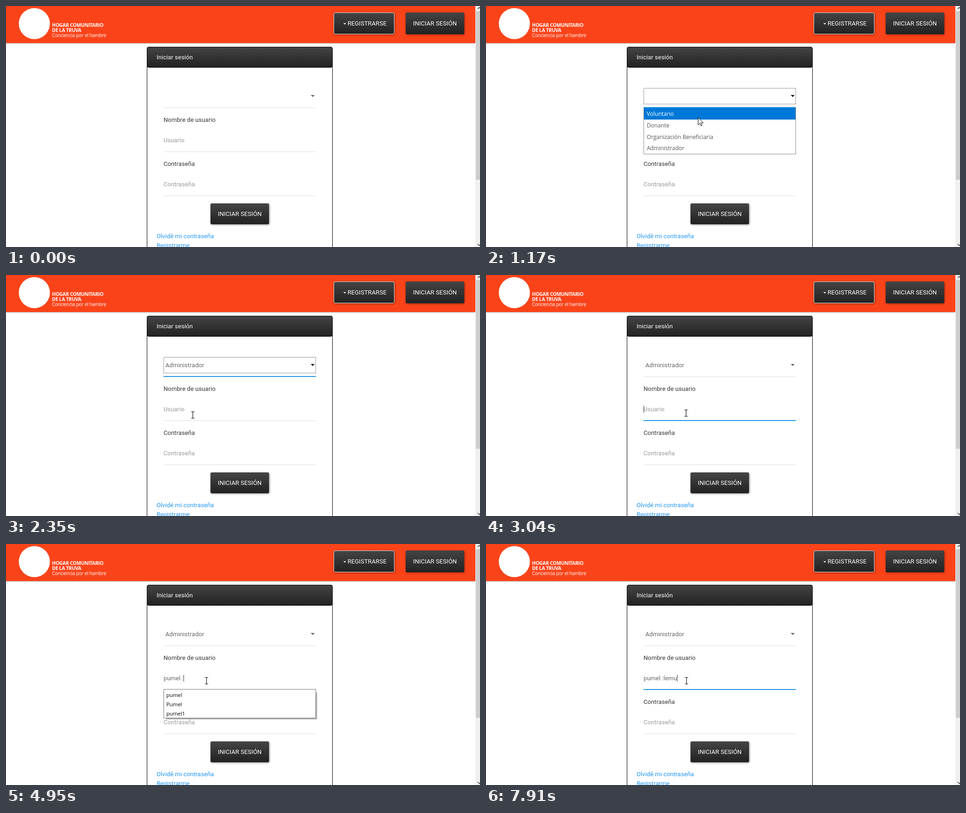
An HTML page for the animation above (8 s loop, 1020 by 520 pixels).

```html
<!DOCTYPE html>
<html lang="es">
<head>
<meta charset="utf-8">
<title>Iniciar sesión</title>
<style>
  html, body { margin: 0; width: 100%; height: 100%; overflow: hidden; background: #fff; }
  svg { display: block; width: 1020px; height: 520px; }
  text { font: 13px Roboto, sans-serif; letter-spacing: .1px; white-space: pre; fill: #666; }
  rect { shape-rendering: crispEdges; }
  .round { shape-rendering: auto; }
  .light { fill: #fff; }
  .label { fill: #333; }
  .hint { fill: #999; }
  .link { fill: #2196f3; }
  .line { fill: #ddd; }
  .focus { fill: #2196e8; }
  .brand { font: 10.4px "Open Sans", sans-serif; letter-spacing: -.3px; fill: #fff; }
  .bold { font-weight: 700; }
  .option { font: 12px "Open Sans", sans-serif; letter-spacing: .03px; fill: #555; }
  .saved { font: 11.4px "Open Sans", sans-serif; letter-spacing: 0; fill: #000; }
  .button { filter: drop-shadow(1px 1px 2px rgba(0, 0, 0, .45)); }
  .header { filter: drop-shadow(0 1px 1px rgba(0, 0, 0, .3)); }
</style>
</head>
<body>
<svg viewBox="0 0 1020 520">
  <defs>
    <linearGradient id="dark" x2="0" y2="1">
      <stop stop-color="#444"/><stop offset="1" stop-color="#222"/>
    </linearGradient>
  </defs>
  <rect width="1020" height="520" fill="#fff"/>

  <rect class="header" width="1010" height="80" fill="#fb4319"/>
  <circle cx="61" cy="38" r="33.5" fill="#fff"/>
  <text class="brand bold" x="99" y="45">HOGAR COMUNITARIO</text>
  <text class="brand bold" x="99" y="56">DE LA TRUVA</text>
  <text class="brand" x="99" y="67">Conciencia por el hambre</text>

  <rect class="round button" x="705.5" y="14.5" width="130" height="46" rx="3.5" fill="url(#dark)" stroke="#e6e6e6"/>
  <path d="M726 37h6l-3 3z" fill="#fff"/>
  <text class="light" x="735" y="42">REGISTRARSE</text>
  <rect class="round button" x="860" y="14" width="126" height="47" rx="3" fill="url(#dark)"/>
  <text class="light" x="876" y="42">INICIAR SESIÓN</text>

  <rect class="round" x="303.5" y="88.5" width="399" height="480" rx="4" fill="#fff" stroke="#000"/>
  <rect class="round" x="303.5" y="88.5" width="399" height="44" rx="4" fill="url(#dark)" stroke="#000"/>
  <text class="light" x="324" y="115">Iniciar sesión</text>

  <rect class="line" x="339" y="219" width="328" height="1"/>
  <rect class="focus" id="roleLine" x="339" y="218" width="328" height="2"/>
  <rect id="roleBox" x="339.5" y="177.5" width="327" height="34" fill="none" stroke="#333" stroke-dasharray="1 1"/>
  <text id="role" x="343" y="199">Administrador</text>
  <path id="roleArrow" d="M655.8 192h8.4l-4.2 4.4z"/>

  <text class="label" x="339" y="250">Nombre de usuario</text>
  <text class="hint" id="userHint" x="339" y="294">Usuario</text>
  <text id="user" x="339" y="294"></text>
  <rect id="caret" y="282" width="1" height="15" fill="#444"/>
  <rect class="line" x="339" y="314" width="328" height="1"/>
  <rect class="focus" id="userLine" x="339" y="313" width="328" height="2"/>

  <text class="label" x="339" y="345">Contraseña</text>
  <text class="hint" x="339" y="389">Contraseña</text>
  <rect class="line" x="339" y="409" width="328" height="1"/>
  <rect class="round button" x="440" y="426" width="126" height="45" rx="3" fill="url(#dark)"/>
  <text class="light" x="456" y="453">INICIAR SESIÓN</text>
  <text class="link" x="324" y="501">Olvidé mi contraseña</text>
  <text class="link" x="324" y="521">Registrarme</text>

  <rect x="1010" width="10" height="520" fill="#f0f0f0"/>
  <rect x="1011" y="11" width="9" height="364" fill="#cdcdcd"/>
  <path d="M1015 6.5l3.5-3.5 3.5 3.5M1015 513.5l3.5 3.5 3.5-3.5" fill="none" stroke="#505050" stroke-width="1.6"/>

  <g id="roleList">
    <rect x="339.5" y="219.5" width="327" height="100" fill="#fff" stroke="#8c8c8c"/>
    <rect class="focus" x="339" y="218" width="328" height="2"/>
    <rect id="mark" x="340" width="326" height="25" fill="#0078d7"/>
  </g>
  <g id="savedList">
    <rect id="savedShade" x="344" y="320" width="325" fill="#999" style="filter: blur(.8px)"/>
    <rect id="savedBox" x="339.5" y="313.5" width="327" fill="#fff" stroke="#777"/>
  </g>

  <path id="arrow" d="M.5.5v16l3.7-3.4 2.6 5.6 2.3-1-2.6-5.5h5z" fill="#fff" stroke="#000"/>
  <path id="beam" d="M-3.5-7h3l.5.5.5-.5h3M-3.5 7h3l.5-.5.5.5h3M0-6.5v13" fill="none" stroke="#000" stroke-width="1.1"/>
</svg>
<script>
const LOOP = 8000;
const $ = id => document.getElementById(id);
const set = (id, attrs) => {
  for (const key in attrs) $(id).setAttribute(key, attrs[key]);
};
const show = (id, on) => set(id, { visibility: on ? 'visible' : 'hidden' });

function addTexts(parent, words, cls, x, y, step) {
  return words.map((word, i) => {
    const el = document.createElementNS('http://www.w3.org/2000/svg', 'text');
    el.textContent = word;
    el.setAttribute('class', cls);
    el.setAttribute('x', x);
    el.setAttribute('y', Math.round(y + i * step));
    return $(parent).appendChild(el);
  });
}

const options = addTexts('roleList',
  ['Voluntario', 'Donante', 'Organización Beneficiaria', 'Administrador'], 'option', 346, 237, 24.75);
const saved = addTexts('savedList',
  ['pumel', 'Pumel', 'pudosu', 'pumel1', 'sopudosup', 'tipodo'], 'saved', 345, 330, 20);
const filters = { 6: [0, 1, 2, 3, 4, 5], 5: [0, 1, 2, 3, 4], 3: [0, 1, 3] };

const TYPED = 'pumel :lemup';
const keyTimes = [3700, 3860, 4020, 4170, 4400, 4480, 4950, 6070, 6340, 6490, 6580, 6670];
const ERASE = 7910;
const caretOn = [[2840, 3400], [4170, 4480], [4720, 5590], [6160, 7210], [7760, LOOP]];
const savedRows = [[0, 0], [3780, 6], [3930, 5], [4020, 3], [5040, 0]];

// Pointer: sampled sweeps first, then held positions
const sweep = [[70, 685, 389], [310, 570, 280], [550, 497, 211], [700, 497, 211],
  [1010, 485, 219], [1250, 440, 252], [1480, 403, 290]];
const rests = [[1480, 403, 290], [1580, 402, 295], [1810, 400, 299], [1880, 399, 301],
  [2350, 402, 302], [2520, 417, 300], [2590, 430.5, 298], [3780, 431.5, 295]];

const last = (keys, t) => keys.filter(k => k[0] <= t).pop();
const ramp = (t, from, span) => Math.min(1, Math.max(0, (t - from) / span));

function pointer(t) {
  if (t >= 1480) return last(rests, t).slice(1);
  const s = t < 700 ? 70 + Math.floor((t - 70) / 80) * 80
    : 700 + Math.floor((t - 700) / 77.5) * 77.5;
  const from = last(sweep, s);
  const to = sweep[sweep.indexOf(from) + 1] || from;
  const k = ramp(s, from[0], to[0] - from[0] || 1);
  return [1, 2].map(i => Math.round(from[i] + (to[i] - from[i]) * k));
}

function drawRole(t, y) {
  const focused = t >= 700 && t < 2840;
  const open = t >= 780 && t < 2280;
  const row = open && y > 221 ? Math.min(3, Math.floor((y - 220) / 24.7)) : -1;
  show('roleBox', focused);
  show('role', t >= 2280);
  set('roleArrow', { fill: focused ? '#111' : '#666' });
  set('roleLine', { opacity: ramp(t, 700, 150) - ramp(t, 2840, 200) });
  set('roleList', { display: open ? 'inline' : 'none' });
  show('mark', row >= 0);
  set('mark', { y: Math.floor(220 + row * 24.75) });
  options.forEach((el, i) => { el.style.fill = i === row ? '#fff' : ''; });
}

function drawUser(t) {
  const count = keyTimes.filter(k => k <= t).length - (t >= ERASE ? 1 : 0);
  $('user').textContent = TYPED.slice(0, count);
  show('userHint', count === 0);
  set('userLine', { opacity: ramp(t, 2840, 200) });
  show('caret', caretOn.some(([a, b]) => t >= a && t < b));
  set('caret', { x: 339 + (count ? Math.floor($('user').getComputedTextLength()) : 0) });
}

function drawSaved(t) {
  const rows = last(savedRows, t)[1];
  set('savedList', { display: rows ? 'inline' : 'none' });
  if (!rows) return;
  set('savedBox', { height: rows * 20 + 2 });
  set('savedShade', { height: rows * 20 - 2 });
  saved.forEach((el, i) => {
    const place = filters[rows].indexOf(i);
    el.setAttribute('display', place < 0 ? 'none' : 'inline');
    el.setAttribute('y', 330 + place * 20);
  });
}

function draw(t) {
  const beam = t >= 2350;
  show('arrow', t >= 70 && !beam);
  show('beam', beam);
  let y = 0;
  if (t >= 70) {
    const at = pointer(t);
    y = at[1];
    set(beam ? 'beam' : 'arrow', { transform: `translate(${at})` });
  }
  drawRole(t, y);
  drawUser(t);
  drawSaved(t);
}

const start = performance.now();
function tick() {
  draw((performance.now() - start) % LOOP);
  requestAnimationFrame(tick);
}
tick();
</script>
</body>
</html>
```
